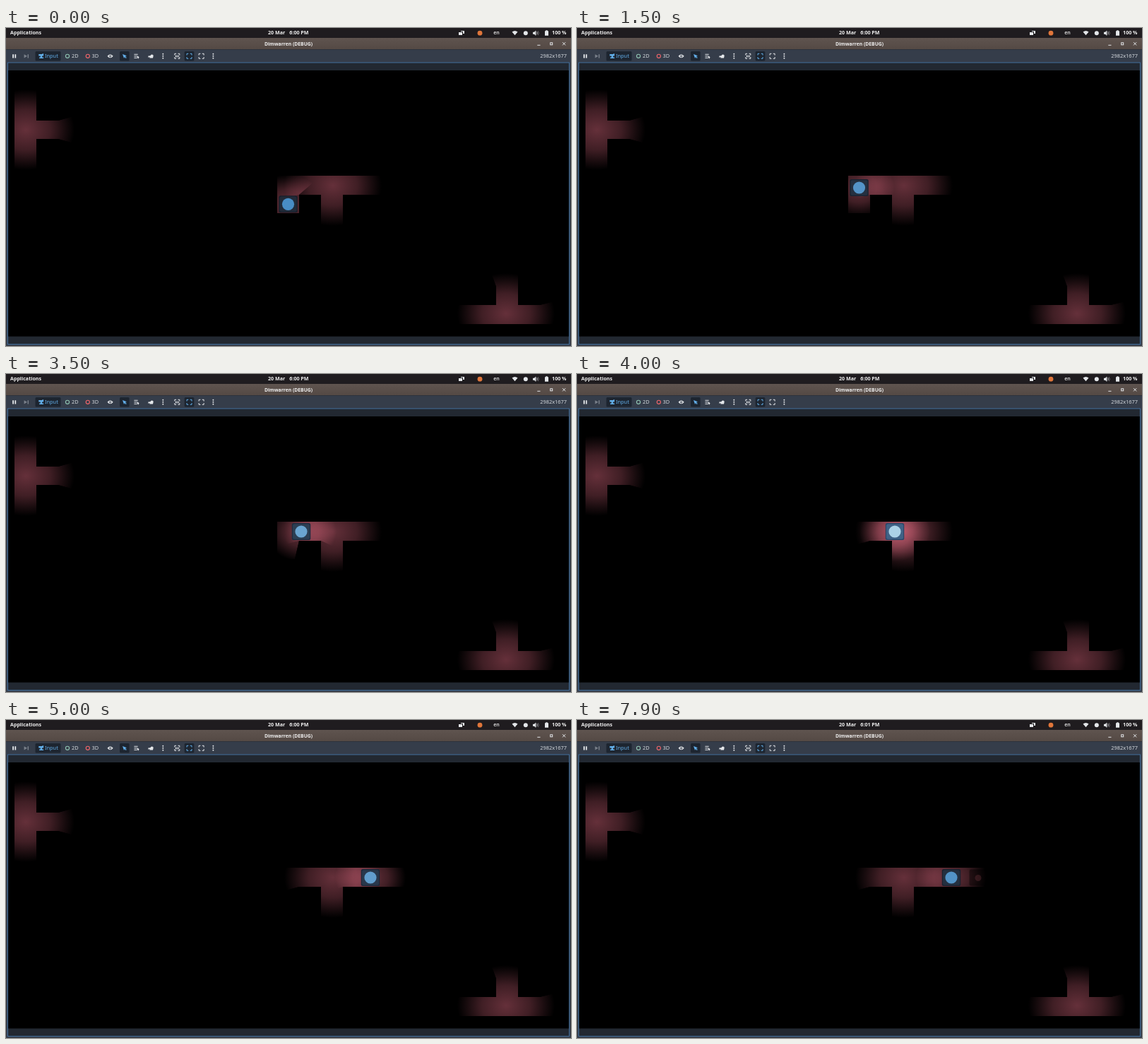
An HTML page with a canvas for the animation above (8 s loop, 800 px wide and 450 px high).

```html
<!DOCTYPE html>
<html lang="en">
<head>
<meta charset="utf-8">
<title>Dimwarren (DEBUG)</title>
<style>
  html, body { margin: 0; width: 100%; height: 100%; overflow: hidden; background: #353d4a; }
  canvas, svg { position: absolute; left: 0; top: 0; width: 800px; height: 450px; display: block; }
  text { font-family: "Noto Sans", "Open Sans", sans-serif; font-size: 7.4px; fill: #d5d9de; }
  .bar { font-family: "Open Sans", "Noto Sans", sans-serif; font-size: 7.1px; font-weight: 700; fill: #f0f0f0; }
  .w { fill: #e4e7ea; }
  .l { fill: none; stroke: #e4e7ea; stroke-width: 1; }
  .b { fill: #62aee8; }
  .on { fill: #1d2530; }
</style>
</head>
<body>
<canvas id="game" width="800" height="450"></canvas>
<svg viewBox="0 0 800 450">
  <defs>
    <linearGradient id="head" x2="0" y2="1">
      <stop stop-color="#5f544f"/><stop offset="1" stop-color="#544944"/>
    </linearGradient>
    <g id="dots"><circle cy="-3" r="1"/><circle r="1"/><circle cy="3" r="1"/></g>
    <path id="corners" d="M-3.5-1.2V-3.5H-1.2M1.2-3.5H3.5V-1.2M3.5 1.2V3.5H1.2M-1.2 3.5H-3.5V1.2"/>
  </defs>

  <!-- desktop bar -->
  <rect width="800" height="14" fill="#1f1c1f"/>
  <text class="bar" x="6" y="9.4">Applications</text>
  <text class="bar" x="371" y="9.4">20 Mar</text>
  <text class="bar" id="clock" x="428.5" y="9.4" text-anchor="end">6:00 PM</text>
  <text class="bar" x="694.5" y="9.4" text-anchor="middle" style="font-weight:600">en</text>
  <text class="bar" x="793.5" y="9.4" text-anchor="end">100 %</text>
  <path class="w" d="M641 6h5v4h-5zM644 4h5v4h-2V5h-3z"/>
  <circle cx="671" cy="7.2" r="3.4" fill="#e0763a"/>
  <path class="w" d="M716.5 5.5Q720.5 2.5 724.5 5.5L720.5 10.3z"/>
  <circle class="w" cx="735.8" cy="7.2" r="3"/>
  <path class="w" d="M746 5.7h2l2.3-2.2v7.4L748 8.7h-2z"/>
  <path class="l" d="M751.6 5.2q1.4 2 0 4" opacity=".8"/>
  <path class="l" d="M753.3 4.2q2 3 0 6" opacity=".4"/>
  <path class="w" d="M763 4.3h1.3v-1h2.4v1h1.3v6.4h-5z"/>

  <!-- window title -->
  <rect y="14" width="800" height="16.5" fill="url(#head)"/>
  <rect y="30" width="800" height="1" fill="#2d323c"/>
  <text class="bar" x="400" y="24.8" text-anchor="middle" style="font-size:6.8px">Dimwarren (DEBUG)</text>
  <path class="l" d="M752.3 24.3h4.2M788 20.2l4.2 4.2M792.2 20.2l-4.2 4.2"/>
  <rect class="l" x="770.7" y="20.8" width="3" height="3"/>

  <!-- toolbar -->
  <rect y="31" width="800" height="18" fill="#353d4a"/>
  <path class="w" d="M9.2 37.2h1.8v5.2H9.2zM12.4 37.2h1.8v5.2h-1.8z"/>
  <path fill="#7a818b" d="M25.6 37.2l4.4 2.6-4.4 2.6zM30.6 37.2H32v5.2h-1.4z"/>
  <rect class="on" x="41.5" y="33" width="36" height="13.6" rx="1.5"/>
  <path class="b" d="M46.3 37h5.2v-.8h1.6v3.4h-2v2h2V43h-6v-1.4h1.6v-2h-2.4z"/>
  <text class="b" x="55" y="42.4" style="fill:#62aee8">Input</text>
  <circle cx="87" cy="39.8" r="2.6" fill="none" stroke="#8fc3b1" stroke-width="1.1"/>
  <text x="93" y="42.4">2D</text>
  <circle cx="115.8" cy="39.8" r="2.6" fill="none" stroke="#f0666b" stroke-width="1.1"/>
  <text x="121.5" y="42.4">3D</text>
  <path class="w" d="M143.5 39.8q4-5 8.2 0-4.2 5-8.2 0z"/>
  <circle cx="147.6" cy="39.8" r="1.6" fill="#353d4a"/>
  <circle class="w" cx="147.6" cy="39.8" r=".8"/>
  <rect class="on" x="161" y="33" width="13.6" height="13.6" rx="1.5"/>
  <path class="b" d="M165 37l6 2.2-2 .9 1.7 1.9-1 .9-1.7-1.8-.9 1.8z"/>
  <path class="l" d="M181.4 37.3h5.2M181.4 39.8h4.2M181.4 42.3h4.2"/>
  <path class="w" d="M185.8 39l3 2.6-1.2.3.6 1.4h-1l-.5-1.1-.9.7z"/>
  <path class="w" d="M201.4 39.4l3-.2q.4-2 2.5-1.8 2.3.5 1.7 2.4l-.6 2.6h-4.6v-1.4l-2 .8z"/>
  <use class="w" href="#dots" x="222.3" y="39.8"/>
  <use class="l" href="#corners" x="242.3" y="39.8"/>
  <path class="w" d="M240 38.4h1.2v3H240zM243.4 38.4h1.2v3h-1.2zM241.8 38.7h1v1h-1zM241.8 40.2h1v1h-1z"/>
  <rect class="on" x="252.7" y="33" width="13.6" height="13.6" rx="1.5"/>
  <use href="#corners" x="259.5" y="39.8" fill="none" stroke="#62aee8"/>
  <use class="l" href="#corners" x="276.6" y="39.8"/>
  <use class="w" href="#dots" x="293.4" y="39.8"/>
  <text x="794" y="42.4" text-anchor="end">2982x1677</text>

  <!-- viewport frame -->
  <path fill="#353d4a" d="M0 48H2V450H0zM798 48H800V450H798zM0 448H800V450H0z"/>
  <path fill="#222831" d="M2 49H798V60H2zM2 436.5H798V448H2z"/>
  <rect x="2.5" y="49" width="795" height="398.5" fill="none" stroke="#426f9c"/>
</svg>
<script>
const game = document.getElementById('game'), ctx = game.getContext('2d');
const layer = document.createElement('canvas');
layer.width = 800; layer.height = 450;
const lc = layer.getContext('2d');
const clock = document.getElementById('clock');

// Maze grid: open cells as "column,row"
const colX = c => 12 + 31 * c;
const rowY = r => Math.round(130.95 + 26.15 * r);
const open = new Set();
const dig = (c0, r0, c1 = c0, r1 = r0) => {
  for (let c = c0; c <= c1; c++) for (let r = r0; r <= r1; r++) open.add(c + ',' + r);
};
dig(0, -2, 0, 2); dig(1, 0); dig(2, -1, 2, 1);
dig(12, 3, 19, 3); dig(12, 4); dig(14, 4, 14, 5);
dig(19, 10, 24, 10); dig(22, 8, 22, 9); dig(21, 8); dig(24, 9);

const lamps = [[28, 144], [463, 223], [708, 404]];

// start ms, x, y, extra brightness from the lamp
const moves = [
  [0, 399.5, 249.3, 0],
  [1500, 399.5, 226, .12],
  [2000, 399.5, 224, .1],
  [2500, 399.5, 223, .1],
  [3500, 418, 223, .35],
  [4000, 450, 223, 1],
  [4500, 484, 223, .95],
  [5000, 516, 223, .25],
  [5500, 530, 223, .1]
];

// Erase everything hidden behind one side of a wall
function shade(x, y, a, b, c, d) {
  const far = 40;
  lc.beginPath();
  lc.moveTo(a, b);
  lc.lineTo(c, d);
  lc.lineTo(x + (c - x) * far, y + (d - y) * far);
  lc.lineTo(x + (a - x) * far, y + (b - y) * far);
  lc.fill();
}

function light(x, y, rx, ry) {
  lc.globalCompositeOperation = 'source-over';
  lc.clearRect(0, 0, 800, 450);
  lc.save();
  lc.translate(x, y);
  lc.scale(rx, ry);
  const g = lc.createRadialGradient(0, 0, 0, 0, 0, 1);
  [[0, 1], [.5, .63], [.8, .24], [1, 0]].forEach(([p, a]) => g.addColorStop(p, `rgba(101,48,58,${a})`));
  lc.fillStyle = g;
  lc.fillRect(-1, -1, 2, 2);
  lc.restore();

  lc.globalCompositeOperation = 'destination-out';
  lc.fillStyle = '#000';
  const col = Math.floor((x - 12) / 31), row = Math.floor((y - 130.95) / 26.15);
  for (let c = col - 3; c <= col + 3; c++) for (let r = row - 3; r <= row + 3; r++) {
    if (open.has(c + ',' + r)) continue;
    const l = colX(c), t = rowY(r), R = colX(c + 1), b = rowY(r + 1);
    shade(x, y, l, t, R, t);
    shade(x, y, R, t, R, b);
    shade(x, y, R, b, l, b);
    shade(x, y, l, b, l, t);
    lc.fillRect(l, t, R - l, b - t);
  }
  ctx.globalCompositeOperation = 'lighter';
  ctx.drawImage(layer, 0, 0);
  ctx.globalCompositeOperation = 'source-over';
}

const mix = (a, b, k) => `rgb(${a.map((v, i) => Math.round(v + (b[i] - v) * k))})`;

function box(x, y, w, h, fill) {
  ctx.beginPath();
  ctx.roundRect(x - w / 2, y - h / 2, w, h, 2.5);
  ctx.fillStyle = fill;
  ctx.fill();
}

function disc(x, y, r, fill) {
  ctx.beginPath();
  ctx.arc(x, y, r, 0, 7);
  ctx.fillStyle = fill;
  ctx.fill();
}

function draw([, x, y, lit]) {
  ctx.fillStyle = '#000';
  ctx.fillRect(0, 0, 800, 450);
  lamps.forEach(([lx, ly]) => light(lx, ly, 69, 57));
  light(x, y, 50, 42);
  if (x >= 530) {
    box(568, 223, 25, 23, 'rgba(0,0,0,.4)');
    disc(568, 223.5, 4.5, 'rgba(125,58,68,.32)');
  }
  box(x, y, 26.5, 24, mix([24, 30, 42], [42, 70, 104], lit));
  box(x, y, 24, 21.6, mix([33, 42, 56], [64, 98, 134], lit));
  disc(x, y, 8.6, mix([72, 140, 196], [172, 209, 230], lit));
}

let shown;
function frame(now) {
  const t = now % 8000;
  const move = moves.findLast(m => m[0] <= t) || moves[0];
  if (move !== shown) draw(shown = move);
  const time = t < 7500 ? '6:00 PM' : '6:01 PM';
  if (clock.textContent !== time) clock.textContent = time;
  requestAnimationFrame(frame);
}
frame(performance.now());
</script>
</body>
</html>
```
